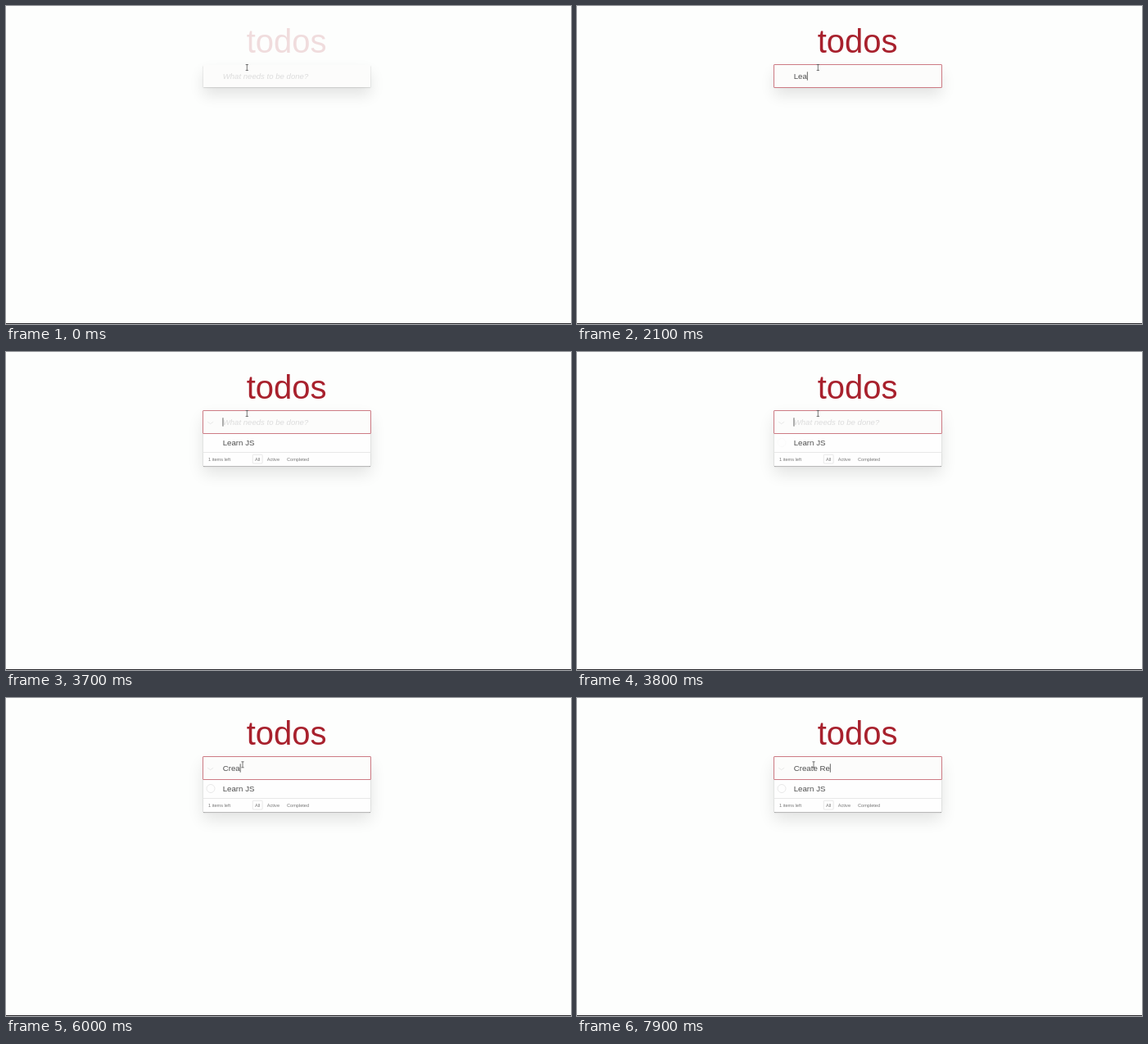
These frames come from a looping animation (690x388 px, 8 s). An HTML page:

```html
<!DOCTYPE html>
<html lang="en">
<head>
<meta charset="utf-8">
<title>todos</title>
<style>
  html, body { margin: 0; width: 100%; height: 100%; overflow: hidden; background: #fdfefd; }
  div { position: absolute; box-sizing: border-box; }
  svg { position: absolute; left: 0; top: 0; }
  text { font-family: "Liberation Sans", Arial, sans-serif; font-size: 9.7px; fill: #4f4f4f; white-space: pre; }
  #panel {
    left: 241px; top: 72px; width: 204px; background: #fefefe;
    box-shadow: 0 .8px 1.6px rgba(0,0,0,.24), 0 9.3px 18.6px rgba(0,0,0,.11);
  }
  #stack {
    left: 241px; top: 123px; width: 204px; height: 16px; background: #fefefe;
    box-shadow: 0 .5px .6px rgba(0,0,0,.25), 0 2.8px 0 -1px #f6f6f6, 0 3.4px .5px -1px rgba(0,0,0,.22);
  }
  #field { left: 241px; top: 72px; width: 204px; height: 27px; background: #fcfcfb; }
  #focus { left: 240px; top: 71px; width: 206px; height: 29px; border: 1px solid #cd7b84; border-radius: 1px; }
  #title { font-size: 40px; fill: #a8212d; }
  #hint { font-size: 9.6px; font-style: italic; fill: #dcdcdc; }
  .small text { font-size: 5.6px; fill: #777; }
  .line { fill: none; stroke: #e3e3e3; stroke-width: .8; }
</style>
</head>
<body>
<div id="panel"></div>
<div id="stack"></div>
<div id="field"></div>
<div id="focus"></div>
<svg width="690" height="388">
  <rect y="387" width="690" height="1" fill="#29292d"/>
  <text id="title" x="293.7" y="56.5">todos</text>
  <text id="hint" x="264.7" y="88.9">What needs to be done?</text>
  <text id="entry" x="264.7" y="88.9" xml:space="preserve"></text>
  <rect id="caret" y="80.3" width=".9" height="10.4" fill="#555"/>
  <g id="list">
    <path class="line" stroke-width="1" d="M246.3 85.3l3.4 2.3 3.4-2.3"/>
    <circle id="check" class="line" cx="250" cy="110.5" r="5"/>
    <text x="264.7" y="114.1">Learn JS</text>
    <path class="line" d="M241 122.5h204"/>
    <rect class="line" x="301.3" y="125.2" width="11.8" height="10.8" rx="1"/>
    <g class="small">
      <text x="247" y="132.5">1 items left</text>
      <text x="304" y="132.5">All</text>
      <text x="318.8" y="132.5">Active</text>
      <text x="343" y="132.5">Completed</text>
    </g>
  </g>
  <path id="mouse" fill="none" stroke="#555" stroke-width=".8" d="M-1.6-3.5h3.2M0-3.5v7M-1.6 3.5h3.2"/>
</svg>
<script>
  const LOOP = 8000, LIST_TIME = 3700;
  const typing = [
    [0, ""], [1700, "L"], [1800, "Le"], [2100, "Lea"], [2500, "Lear"], [2800, "Learn"],
    [3000, "Learn "], [3300, "Learn J"], [3600, "Learn JS"], [LIST_TIME, ""],
    [5500, "Cr"], [5700, "Cre"], [6000, "Crea"], [6100, "Creat"], [6400, "Create"],
    [6800, "Create "], [6900, "Create R"], [7100, "Create Re"], [7400, "Create Rea"],
    [7700, "Create Reac"], [7900, "Create Re"]
  ];
  const caretOff = [[0, 200], [700, 1100], [1600, 1700], [4300, 5100]];
  const el = id => document.getElementById(id);
  const clamp = v => Math.max(0, Math.min(1, v));
  const show = (id, on) => { el(id).style.visibility = on ? "visible" : "hidden"; };

  function draw(t) {
    const tick = Math.floor(t / 100);
    const focused = clamp((tick - 1) / 4);
    el("title").style.opacity = .15 + .85 * focused;
    el("focus").style.opacity = focused;

    const text = typing.findLast(([start]) => t >= start)[1];
    const entry = el("entry");
    entry.textContent = text;
    show("hint", !text);
    el("caret").setAttribute("x", 264.5 + (text ? entry.getComputedTextLength() + .2 : 0));
    show("caret", !caretOff.some(([from, to]) => t >= from && t < to));

    const listed = t >= LIST_TIME;
    show("list", listed);
    show("stack", listed);
    el("panel").style.height = listed ? "67px" : "27px";
    el("check").style.opacity = clamp((tick - 37) / 3) ** 1.5;

    const moved = clamp((tick - 42) / 2);
    el("mouse").setAttribute("transform", `translate(${294.3 - 5.3 * moved} ${75 + 6.3 * moved})`);
  }

  const begin = performance.now();
  function frame() {
    draw((performance.now() - begin) % LOOP);
    requestAnimationFrame(frame);
  }
  frame();
</script>
</body>
</html>
```
